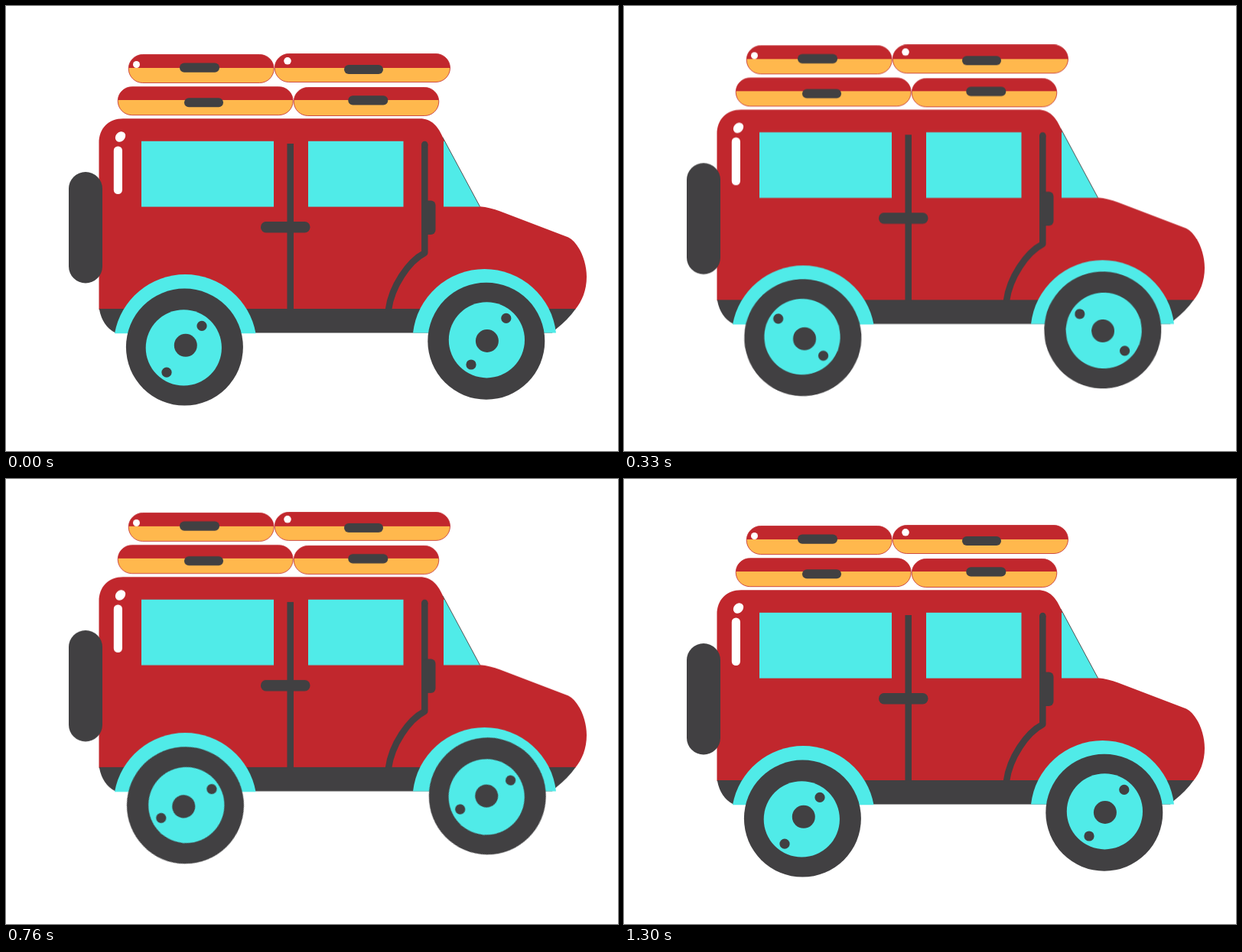
Animation of 800 by 582 pixels, one loop 1340 ms. Source, as an HTML page:

```html
<!DOCTYPE html>
<html lang="en">
<head>
<meta charset="utf-8">
<title>Bouncing car</title>
<style>
  html, body { margin: 0; width: 100%; height: 100%; overflow: hidden; background: #fff; }
  svg { display: block; width: 100vw; height: 100vh; }
  .red { fill: #c1272d; }
  .dark { fill: #414042; }
  .cyan { fill: #50ebe8; }
  .white { fill: #fff; }
  .seam { fill: none; stroke: #414042; stroke-width: 8.5; stroke-linejoin: round; }
  .bags { stroke: #c1272d; stroke-width: .8; }

  /* 40 poses, 30 per second; the last one is held until the loop ends */
  .car { animation: bounce 1340ms -3.4ms infinite; }
  .wheel { animation: spin 1340ms -3.4ms infinite; }
  .rear { transform-origin: 233.9px 445.9px; }
  .front { transform-origin: 628.1px 435.9px; }

  @keyframes bounce {
    0% { transform: translateY(0); animation-timing-function: steps(19); }
    47.26% { transform: translateY(-22.2px); animation-timing-function: steps(20); }
    97.01%, 100% { transform: translateY(-2px); }
  }
  @keyframes spin {
    0% { transform: rotate(0deg); animation-timing-function: steps(39); }
    97.01%, 100% { transform: rotate(360deg); }
  }
</style>
</head>
<body>
<svg viewBox="0 0 800 582">
  <defs>
    <linearGradient id="upper" gradientUnits="userSpaceOnUse" x1="0" y1="61.5" x2="0" y2="101.5">
      <stop offset=".5" stop-color="#c1272d"/><stop offset=".5" stop-color="#ffb84d"/>
    </linearGradient>
    <linearGradient id="lower" gradientUnits="userSpaceOnUse" x1="0" y1="103.5" x2="0" y2="143.5">
      <stop offset=".5" stop-color="#c1272d"/><stop offset=".5" stop-color="#ffb84d"/>
    </linearGradient>
  </defs>

  <g class="car">
    <!-- roof bags -->
    <g class="bags">
      <rect x="160.2" y="63.5" width="190" height="37" rx="18.5" fill="url(#upper)"/>
      <rect x="351.2" y="62.5" width="229.3" height="37" rx="18.5" fill="url(#upper)"/>
      <rect x="146.2" y="105.7" width="229" height="37" rx="18.5" fill="url(#lower)"/>
      <rect x="376.2" y="106.5" width="189.6" height="37" rx="18.5" fill="url(#lower)"/>
    </g>
    <g class="dark">
      <rect x="227" y="74.5" width="52" height="12.2" rx="6"/>
      <rect x="442" y="77" width="51" height="12" rx="6"/>
      <rect x="233" y="120.2" width="51" height="12" rx="6"/>
      <rect x="447.3" y="117.3" width="52" height="12.2" rx="6"/>
    </g>
    <circle class="white" cx="170.5" cy="76.5" r="4.5"/>
    <circle class="white" cx="368" cy="71.8" r="4.8"/>

    <!-- body -->
    <path class="red" d="M121.5 397V179C121.5 160 134 147.3 153 147.3H541C556 147.3 565 157 572 174L619.5 262.3Q633 263.5 646 268.5L735 302.5C748 309 759 332 759 354C759 372 753 386 744 397Z"/>
    <path class="dark" d="M121.8 396H744.7Q735 410 718.5 423L714 427.5H143Q126 419 121.8 396Z"/>
    <rect class="dark" x="82" y="217" width="44" height="145.5" rx="22"/>

    <!-- windows -->
    <g class="cyan">
      <rect x="177" y="176.8" width="173" height="85.8"/>
      <rect x="395" y="176.8" width="124.5" height="85.8"/>
      <path d="M572 176.8H573.5L619.5 262.6H572Z"/>
    </g>
    <path d="M571 172L619.5 262.3" fill="none" stroke="#414042" stroke-width=".8"/>

    <!-- doors -->
    <path class="seam" d="M371.7 180V397"/>
    <path class="seam" d="M547.3 181V323C526 334 504 367 500 397"/>
    <g class="dark">
      <circle cx="547.3" cy="181" r="4.25"/>
      <rect x="333" y="282" width="64.5" height="14.6" rx="7"/>
      <rect x="545" y="254.5" width="16.5" height="44.5" rx="6"/>
    </g>

    <!-- highlights -->
    <rect class="white" x="140.8" y="183.5" width="11.2" height="62.5" rx="5.5"/>
    <ellipse class="white" cx="149.5" cy="171" rx="7.3" ry="6" transform="rotate(-45 149.5 171)"/>

    <!-- arches -->
    <path class="cyan" d="M142 428.3A93.7 93.7 0 0 1 326.5 428.3Z"/>
    <path class="cyan" d="M532 427.5A94.1 94.1 0 0 1 719 427.5Z"/>

    <!-- wheels, slightly off-centre -->
    <g class="wheel rear">
      <circle class="dark" cx="233.4" cy="446.1" r="76.5"/>
      <circle class="cyan" cx="232.3" cy="446.9" r="49.6"/>
      <g class="dark">
        <circle cx="234.8" cy="443.8" r="15"/>
        <circle cx="256" cy="418.4" r="6.6"/>
        <circle cx="210" cy="479.2" r="6.6"/>
      </g>
    </g>
    <g class="wheel front">
      <circle class="dark" cx="627.8" cy="438.2" r="76.5"/>
      <circle class="cyan" cx="628.4" cy="436.8" r="49.6"/>
      <g class="dark">
        <circle cx="628.9" cy="438" r="15"/>
        <circle cx="653.8" cy="408.4" r="6.6"/>
        <circle cx="608" cy="469" r="6.6"/>
      </g>
    </g>
  </g>
</svg>
</body>
</html>
```
